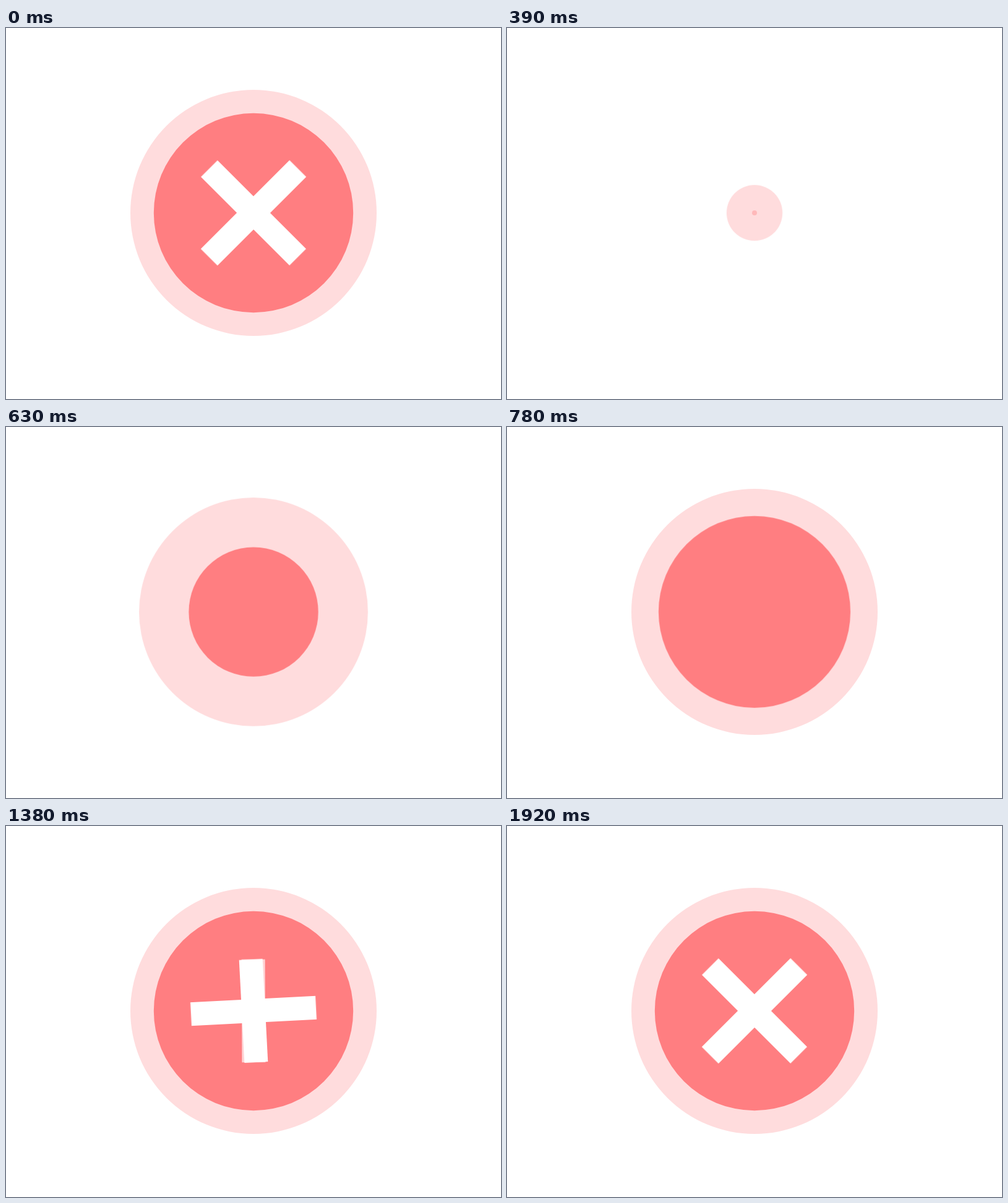
Animation, 800 px wide and 600 px high, one loop 2.25 s. Source, as an HTML page:

```html
<!DOCTYPE html>
<html lang="en">
<head>
<meta charset="utf-8">
<title>Error badge</title>
<style>
  html, body { margin: 0; width: 100%; height: 100%; overflow: hidden; background: #fff; }
  svg { display: block; width: 800px; height: 600px; }

  /* The cycle begins with the blank stage, 120 ms after load. */
  .halo, .disc, .flat, .tall, .spin {
    transform-origin: 0 0;
    animation-duration: 2250ms;
    animation-delay: calc(var(--lag, 0ms) - 2130ms);
    animation-iteration-count: infinite;
    animation-timing-function: cubic-bezier(.51, 0, .46, 1), linear;
  }
  .halo { fill: #ffdcdd; animation-name: halo, halo-fade; }
  .disc { fill: #ff7e81; animation-name: disc, disc-fade; }
  .flat, .tall { fill: #fff; --lag: 0ms; }
  .flat { animation-name: flat; }
  .tall { animation-name: tall; }
  .spin { animation-name: spin; animation-timing-function: cubic-bezier(.333, 0, .667, 1); }

  @keyframes halo {
    0%, 3.511% { transform: scale(0); }
    28.178%, 100% { transform: scale(1); }
  }
  @keyframes halo-fade {
    0%, 5.156% { opacity: 0; }
    9.333%, 100% { opacity: 1; }
  }
  @keyframes disc {
    0%, 8.844% { transform: scale(0); }
    33.511%, 100% { transform: scale(1); }
  }
  @keyframes disc-fade {
    0%, 10.489% { opacity: 0; }
    14.667%, 100% { opacity: 1; }
  }
  @keyframes flat {
    0%, 31.467% { transform: scale(0, 1); }
    56.133%, 100% { transform: scale(1, 1); }
  }
  @keyframes tall {
    0%, 39.511% { transform: scale(1, 0); }
    64.178%, 100% { transform: scale(1, 1); }
  }
  @keyframes spin {
    0%, 54% { transform: rotate(0deg); }
    77.111%, 100% { transform: rotate(-135deg); }
  }
</style>
</head>
<body>
<svg viewBox="0 0 800 600" width="800" height="600">
  <g transform="translate(400 299)">
    <circle class="halo" r="199"/>
    <circle class="disc" r="161.2"/>
    <!-- trailing echoes of the upright bar -->
    <g class="spin" style="--lag: 60ms" opacity=".2"><rect class="tall" x="-19" y="-101.2" width="38" height="202.4"/></g>
    <g class="spin" style="--lag: 30ms" opacity=".59"><rect class="tall" x="-19" y="-101.2" width="38" height="202.4"/></g>
    <g class="spin">
      <rect class="tall" x="-19" y="-101.2" width="38" height="202.4"/>
      <rect class="flat" x="-101.2" y="-19" width="202.4" height="38"/>
    </g>
  </g>
</svg>
</body>
</html>
```
